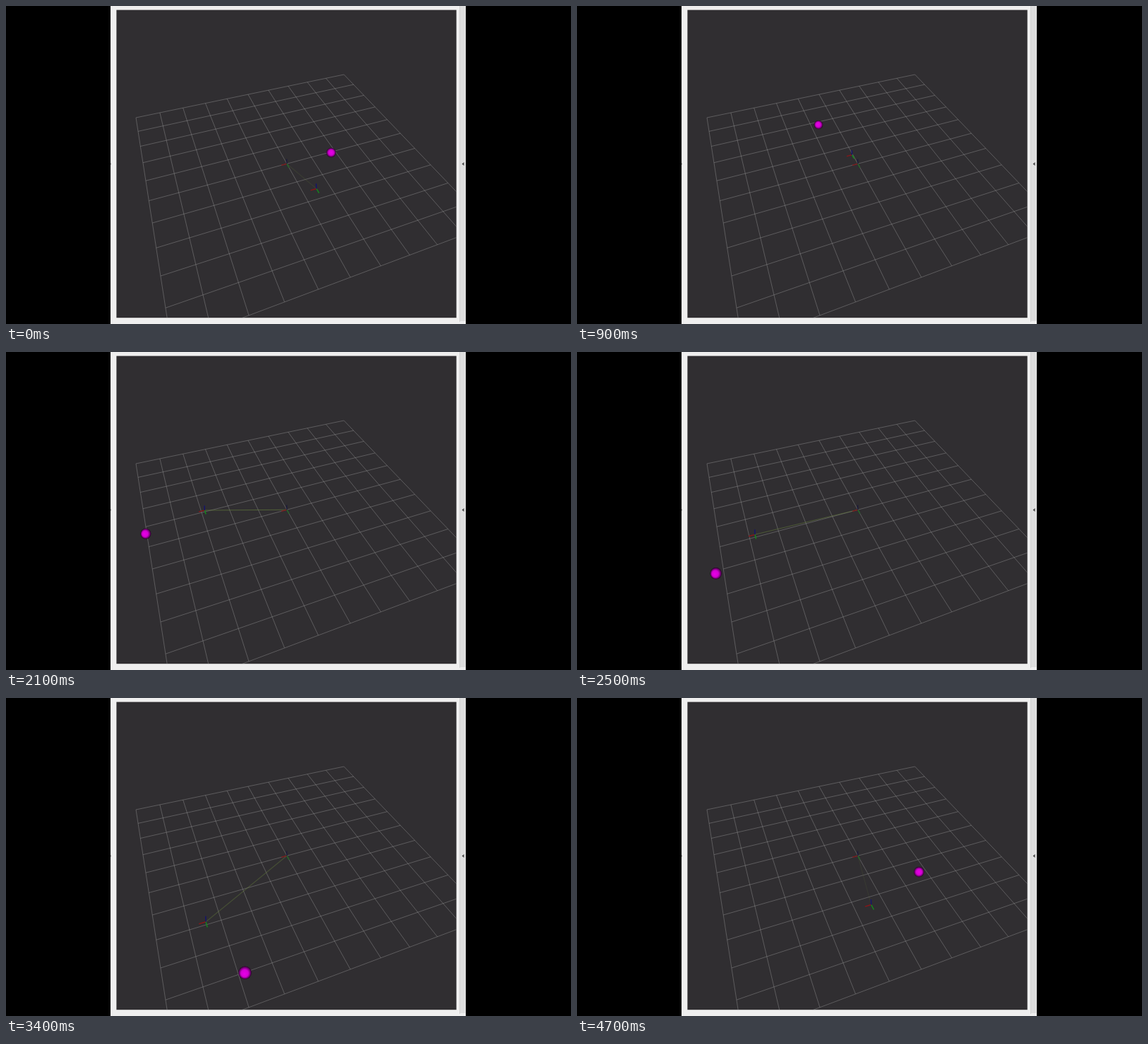
An HTML page with a canvas that plays this animation: 800x450 px, repeating every 4.8 s.

```html
<!DOCTYPE html>
<html lang="en">
<head>
<meta charset="utf-8">
<title>Orbiting frame and marker</title>
<style>
html, body { margin: 0; width: 100%; height: 100%; overflow: hidden; background: #000; }
canvas { display: block; }
</style>
</head>
<body>
<canvas id="stage" width="800" height="450"></canvas>
<script>
const ctx = document.getElementById('stage').getContext('2d');
const LOOP = 4800, STEP = 100;
const VIEW = [156.4, 5.6, 481.3, 435.6];

// Stops of the moving axes: seconds, ground x, ground y, link opacity
const stops = [
  [0, .51, 1.55, .16], [.35, .75, .55, .14], [.9, -.03, -.54, .2],
  [1.7, -1.94, -2.03, .7], [2.5, -3.8, -.13, .5], [2.9, -4.59, .75, .48],
  [3.9, -2.34, 3.02, .3], [4.1, -1.9, 3.3, .26], [4.7, -.43, 2.33, .14]
];

// Perspective of the ground, measured in cells from its middle
function project(x, y) {
  const u = (x + 5) / 10, v = (y + 5) / 10;
  const w = 1 + .17013 * u - .42242 * v;
  return {
    x: (184 + 375.91 * u - 48.85 * v) / w,
    y: (158 - 44.5 * u + 118.66 * v) / w,
    w
  };
}

function line(a, b, color, width = 1) {
  ctx.strokeStyle = color;
  ctx.lineWidth = width;
  ctx.beginPath();
  ctx.moveTo(a.x, a.y);
  ctx.lineTo(b.x, b.y);
  ctx.stroke();
}

function rect(x, y, w, h, color) {
  ctx.fillStyle = color;
  ctx.fillRect(x, y, w, h);
}

function drawWindow() {
  rect(0, 0, 800, 450, '#000');
  rect(148, 0, 503, 450, '#efefef');
  rect(642, 0, 1, 447, '#d2d2d2');
  rect(643, 0, 7.5, 446, '#dedede');
  rect(148, 222.5, .6, 2, '#666');
  ctx.fillStyle = '#444';
  ctx.beginPath();
  ctx.moveTo(645.5, 223.5);
  ctx.lineTo(648.5, 221);
  ctx.lineTo(648.5, 226);
  ctx.fill();
  rect(...VIEW, '#302e31');
}

function drawGrid() {
  const color = 'rgba(165,165,165,.38)';
  for (let i = -5; i <= 5; i++) {
    line(project(-5, i), project(5, i), color);
    line(project(i, -5), project(i, 5), color);
  }
}

function drawAxes(x, y, [red, green, blue]) {
  const o = project(x, y);
  line(o, project(x - .22, y), red, 1.4);
  line(o, project(x, y + .22), green, 1.4);
  line(o, { x: o.x - .3, y: o.y - 5.8 / o.w }, blue, 1.4);
}

function axesAt(t) {
  let i = 1;
  while (i < stops.length - 1 && stops[i][0] < t) i++;
  const a = stops[i - 1], b = stops[i];
  const k = (t - a[0]) / (b[0] - a[0]);
  return a.map((value, n) => value + (b[n] - value) * k);
}

function drawBall(t) {
  const angle = -(9.4 + 71.3 * t) * Math.PI / 180;
  const p = project(-1.7 + 3.57 * Math.cos(angle), .62 + 3.57 * Math.sin(angle));
  const r = 6.1 / p.w;
  const dx = Math.min(.4, (p.x - 440) / 110), dy = (p.y - 230) / 80;
  const shade = ctx.createRadialGradient(p.x + dx, p.y + dy, 0, p.x, p.y, r);
  shade.addColorStop(0, '#e800e8');
  shade.addColorStop(.55, '#d400d4');
  shade.addColorStop(.8, '#800080');
  shade.addColorStop(1, '#220022');
  ctx.fillStyle = shade;
  ctx.beginPath();
  ctx.arc(p.x, p.y, r, 0, 7);
  ctx.fill();
}

function draw(t) {
  drawWindow();
  ctx.save();
  ctx.beginPath();
  ctx.rect(...VIEW);
  ctx.clip();
  drawGrid();
  const [, x, y, alpha] = axesAt(t);
  line(project(x, y), project(0, 0), `rgba(104,130,60,${alpha})`, 1.1);
  drawAxes(0, 0, ['#7c1a1c', '#216a25', '#1a1a3c']);
  drawAxes(x, y, ['#8a1518', '#148a1c', '#131370']);
  drawBall(t);
  ctx.restore();
}

const start = performance.now();
function tick() {
  const elapsed = (performance.now() - start) % LOOP;
  draw(Math.floor(elapsed / STEP) * STEP / 1000);
  requestAnimationFrame(tick);
}
tick();
</script>
</body>
</html>
```
